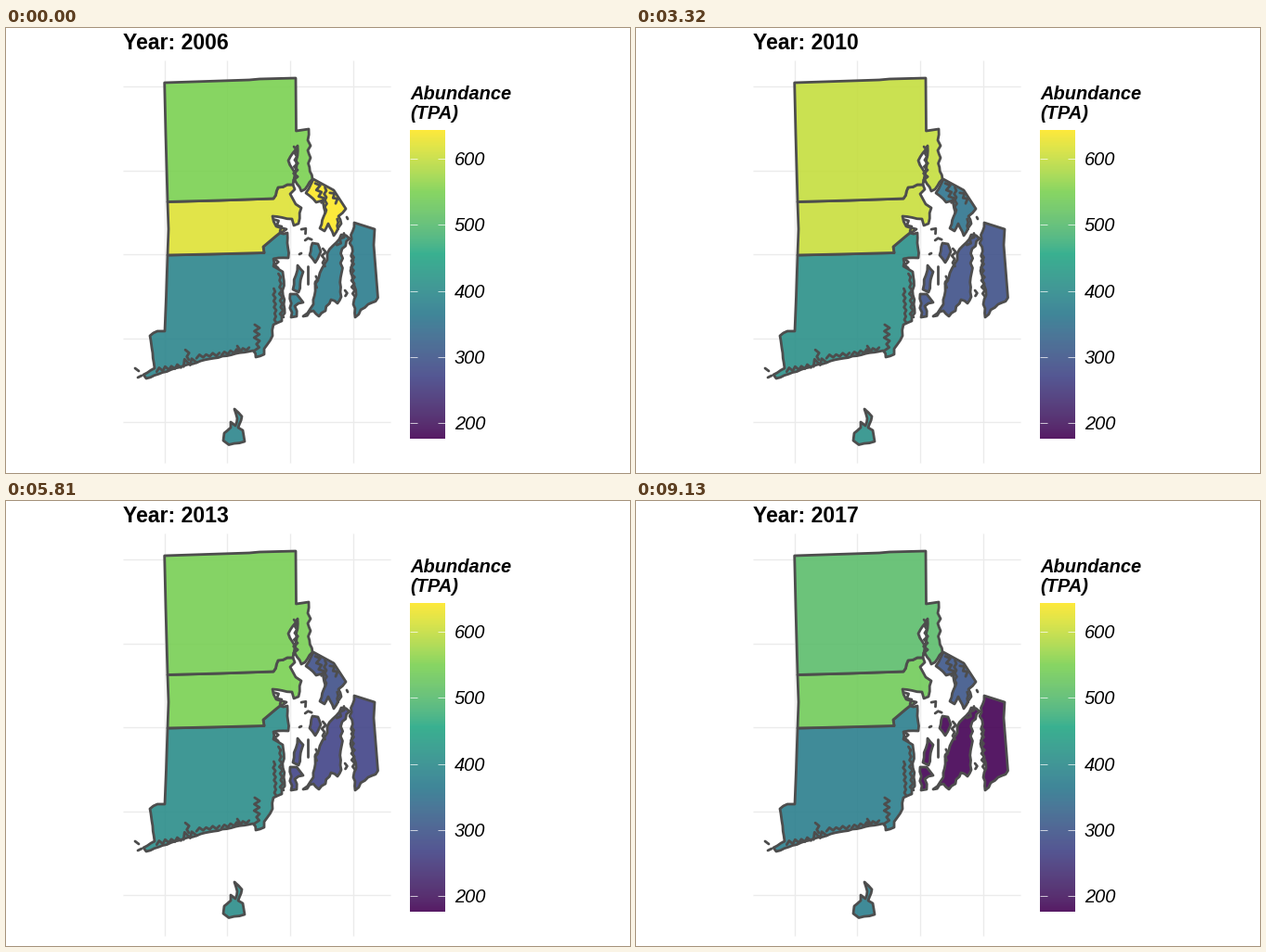
A matplotlib script for the animation above (9.96 s loop, 672 by 480 pixels).

```python
import numpy as np
import matplotlib.pyplot as plt
from matplotlib.animation import FuncAnimation
from matplotlib.patches import Polygon

W, H, DPI = 672, 480, 100
PX = 72 / DPI
INK, GRID, ALPHA = "#4d4d4d", "#ebebeb", 0.9
LOW, HIGH = 176, 643.5
rng = np.random.default_rng(4)

# Colour scale: six stops blended in CIELAB
STOPS = ["#440154", "#414487", "#2a788e", "#22a884", "#7ad151", "#fde725"]
TO_XYZ = np.array([[.4124, .3576, .1805], [.2126, .7152, .0722], [.0193, .1192, .9505]])
WHITE = TO_XYZ.sum(axis=1)
TO_LAB = np.array([[0, 116, 0], [500, -500, 0], [0, 200, -200]])


def to_lab(rgb):
    rgb = np.asarray(rgb)
    lin = np.where(rgb > .04045, ((rgb + .055) / 1.055) ** 2.4, rgb / 12.92)
    t = lin @ TO_XYZ.T / WHITE
    f = np.where(t > .008856, np.cbrt(t), 7.787 * t + 16 / 116)
    return f @ TO_LAB.T


def to_rgb(lab):
    f = lab @ np.linalg.inv(TO_LAB).T
    t = np.where(f > .2069, f ** 3, (f - 16 / 116) / 7.787)
    lin = np.clip((t * WHITE) @ np.linalg.inv(TO_XYZ).T, 0, 1)
    return np.where(lin > .0031308, 1.055 * lin ** (1 / 2.4) - .055, 12.92 * lin)


STOP_LAB = to_lab([[int(c[i:i + 2], 16) / 255 for i in (1, 3, 5)] for c in STOPS])


def shade(value):
    t = np.clip((np.atleast_1d(value) - LOW) / (HIGH - LOW), 0, 1)
    lab = [np.interp(t, np.linspace(0, 1, 6), STOP_LAB[:, k]) for k in range(3)]
    rgb = np.clip(to_rgb(np.stack(lab, axis=-1)), 0, 1)
    return np.column_stack([rgb, np.full(len(t), ALPHA)])


def coast(*points, rough=1.3, step=5):
    """Join points by a shoreline that wobbles sideways."""
    out = [points[0]]
    for a, b in zip(np.array(points[:-1], float), np.array(points[1:], float)):
        length = np.hypot(*(b - a))
        n = max(1, round(length / step))
        side = np.array([a[1] - b[1], b[0] - a[0]]) / length
        for k in range(1, n):
            out.append(tuple(a + (b - a) * k / n + side * rng.uniform(-rough, rough)))
        out.append(tuple(b))
    return out


def inlet(x0, y0, x1, y1, width):
    """Zigzag along a narrow strip of water."""
    n = max(2, round(np.hypot(x1 - x0, y1 - y0) / 3.5))
    t = np.linspace(0, 1, n + 1)
    swing = width / 2 * (-1) ** np.arange(n + 1) * rng.uniform(.3, 1, n + 1)
    angle = np.arctan2(y1 - y0, x1 - x0)
    return (x0 + (x1 - x0) * t - swing * np.sin(angle),
            y0 + (y1 - y0) * t + swing * np.cos(angle))


# Yearly abundance, 2006 to 2017
VALUES = {
    "north": [550, 607, 606, 604, 600, 572, 545, 546, 547, 506, 506, 506],
    "middle": [619, 585, 603, 621, 603, 584, 577, 549, 548, 536, 536, 536],
    "south": [389, 393, 401, 409, 410, 410, 410, 404, 399, 376, 376, 376],
    "bay": [643, 389, 372, 356, 356, 356, 283, 290, 302, 302, 302, 302],
    "east": [370, 304, 304, 304, 292, 282, 282, 270, 255, 200, 200, 176],
}

# Borders shared by neighbours, running west to east
upper = [(174, 187.5), (230, 186), (288, 184)] + coast(
    (288, 184), (293, 172), (303, 169), (309, 169), rough=1)
lower = [(174, 245), (220, 244), (278, 242.5), (277, 236), (290, 225), (295, 221)]

north = ([(170.7, 59), (262, 56), (273, 55), (312, 54), (312.5, 111), (326, 109)]
         + coast((326, 109), (325, 121), (328, 127), (325, 132), (328, 140),
                 (325.5, 146), (330, 163), (322, 174), (318, 176), (311, 164),
                 (314, 127), (304, 143), (311, 156), (309, 169), rough=.8)
         + upper[::-1] + [(172, 115)])
middle = (upper
          + coast((309, 169), (311, 174), (306, 179), (312, 190), (318, 194),
                  (315, 211), (310, 213), (308, 206), (287, 203), (291, 214),
                  (302, 217), (295, 221), rough=.9)
          + lower[::-1] + [(175, 217)])
south = (lower
         + coast((295, 221), (303, 221), (304, 248), (288, 249), (288, 257),
                 (298, 263), (300, 303), (297, 316), (288, 320), (287, 332),
                 (278, 346), (278, 352), (269, 355), (266, 348))
         + coast((266, 348), (219, 357), (182, 367), (151, 378), rough=.5)
         + coast((148, 374), (160, 367), (157, 345), (155, 332), (163, 327), rough=.7)
         + [(171, 327), (172.5, 290)])
block = coast((246, 411), (254, 419), (250, 431), (255, 434), (257, 446), (240, 449.5),
              (234, 445), (235, 437), (242, 431), (242, 425), (247, 429), (249, 421),
              (246, 411), rough=.6)
bay = ([(331, 163), (353, 175), (366, 195)]
       + coast((366, 195), (358, 203), (361, 211), (353, 224), (347, 211), (343, 219),
               (338, 216), (344, 199), (341, 186), (334, 188), (323, 178), (331, 163),
               rough=.8))
mainland = [(375, 210), (397, 217), (396, 234), (400.5, 291)] + coast(
    (400.5, 291), (390, 298), (376, 312), (374, 298), (377, 288), (371, 262),
    (374, 250), (370, 232), (375, 210), rough=1.8)
aquidneck = coast((361, 223), (370, 227), (362, 238), (361, 290), (357, 297), (350, 293),
                  (344, 305), (337, 311), (331, 305), (320, 311), (331, 298), (333, 274),
                  (346, 250), (346, 243), (361, 223), rough=1.6)
jamestown = coast((314, 256), (320, 263), (315, 285), (309, 282), (314, 256), rough=.8)
beaver = coast((306, 287), (313, 287), (320, 296), (311, 300), (313, 311), (307, 312),
               (306, 287))
prudence = coast((330, 232), (336, 233), (339, 241), (333, 253), (327, 245), (330, 232),
                 rough=.5)

REGIONS = {
    "south": [south, block],
    "middle": [middle],
    "north": [north],
    "bay": [bay],
    "east": [mainland, aquidneck, jamestown, beaver, prudence],
}

fig = plt.figure(figsize=(W / DPI, H / DPI), dpi=DPI, facecolor="white")
ax = fig.add_axes([0, 0, 1, 1])


def line(xs, ys, color, width, cap="butt", z=3):
    ax.plot(xs, ys, color=color, lw=width * PX, zorder=z,
            solid_capstyle=cap, solid_joinstyle="round")


def label(x, y, text, size, **kw):
    return ax.text(x, y, text, fontsize=size * PX, family="Liberation Sans",
                   color="black", va="baseline", **kw)


for k in range(4):
    line([170.5 + 67.7 * k] * 2, [35, 469], GRID, 1.4, z=1)
for k in range(5):
    line([126, 413.5], [63 + 90.5 * k] * 2, GRID, 1.4, z=1)

patches = {name: [] for name in REGIONS}
for name, outlines in REGIONS.items():
    for points in outlines:
        patch = Polygon(points, closed=True, ec=INK, lw=2.8 * PX,
                        joinstyle="round", zorder=2)
        patches[name].append(ax.add_patch(patch))

# Inlets, ponds and islets: start, end, width
for strip in [
    (139, 367, 143, 370, 0), (142, 377, 146, 375, 0),
    (162, 369, 188, 364, 5), (190, 362, 204, 357, 9), (205, 355, 230, 352, 5),
    (232, 351, 262, 346, 4), (195, 347, 196, 358, 4), (250, 343, 250, 350, 4),
    (271, 320, 271, 348, 8), (289, 281, 290, 318, 3), (295, 265, 297, 312, 4),
    (291, 249, 291, 259, 5), (290, 206, 297, 218, 5), (312, 128, 312, 164, 5),
    (335, 167, 341, 188, 6), (344, 172, 344, 200, 3), (350, 177, 357, 188, 5),
    (357, 206, 357, 217, 2), (367, 204, 368, 206, 0),
    (319, 216, 324, 220, 6), (322, 228, 329, 227, 3), (316, 244, 318, 243, 0),
    (325, 257, 325, 276, 0), (342, 238, 342, 257, 5), (335, 268, 334, 280, 4),
    (365, 222, 358, 235, 5), (373, 244, 374, 290, 4), (366, 283, 366, 289, 3),
]:
    line(*inlet(*strip), INK, 2.8, cap="round")

bar = shade(np.linspace(HIGH, LOW, 333))[:, None, :]
ax.imshow(bar, extent=(435, 473, 443, 110), aspect="auto",
          interpolation="nearest", zorder=2)
for value in range(200, 601, 100):
    y = 141.3 + (600 - value) * 0.7115
    for x in (435, 465.4):
        line([x, x + 7.6], [y, y], "white", 0.7)
    label(483, y + 7, str(value), 20, style="italic")
label(435, 77, "Abundance", 20, style="italic", weight="bold")
label(435, 98, "(TPA)", 20, style="italic", weight="bold")
title = label(126, 23, "", 23, weight="bold")

ax.set_xlim(0, W)
ax.set_ylim(H, 0)
ax.axis("off")


def update(i):
    title.set_text(f"Year: {2006 + i}")
    for name, group in patches.items():
        color = shade(VALUES[name][i])[0]
        for patch in group:
            patch.set_facecolor(color)
    return [title, *sum(patches.values(), [])]


anim = FuncAnimation(fig, update, frames=12, interval=830, repeat=True, repeat_delay=0)
plt.show()
```
